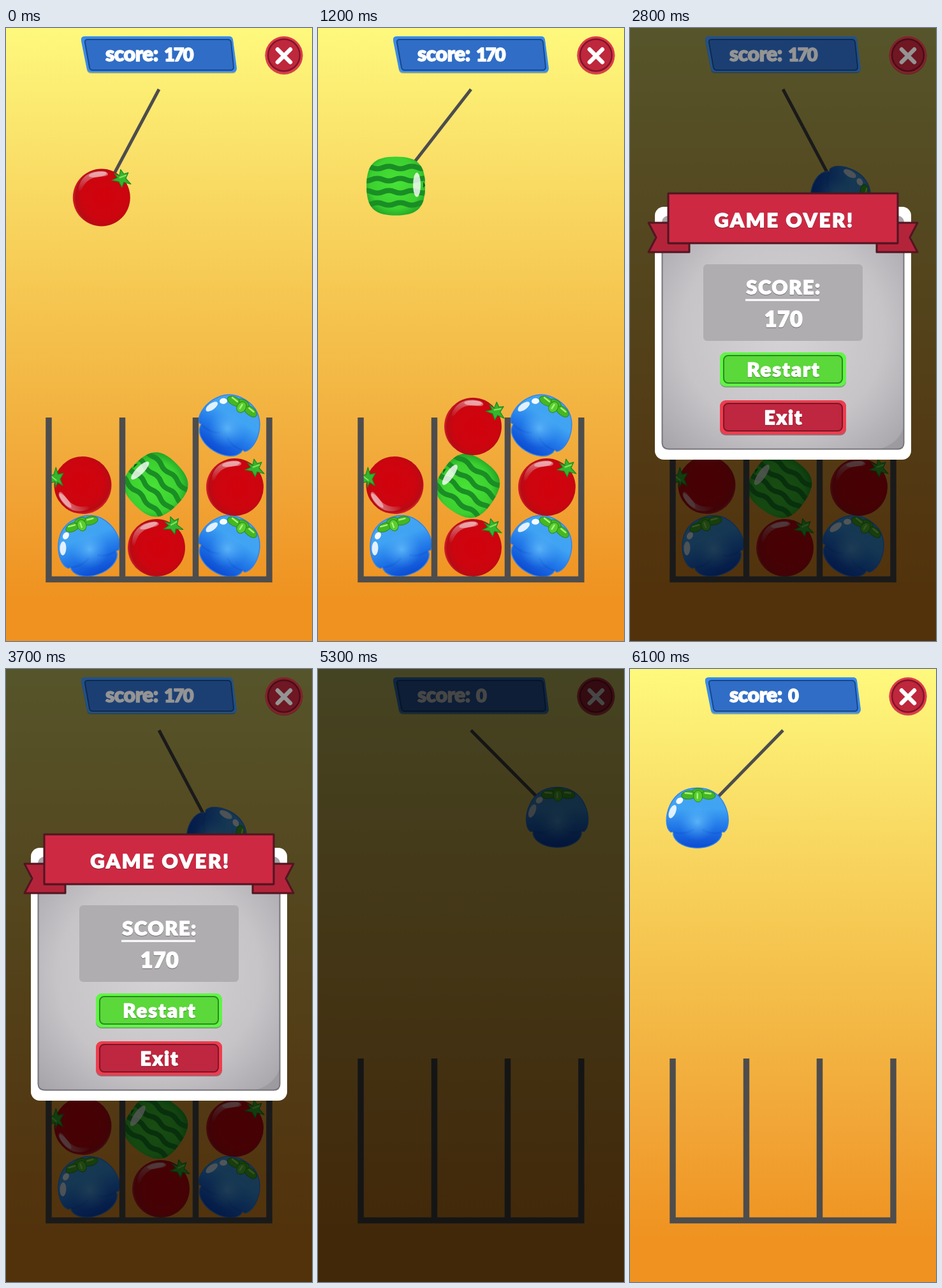
An HTML page that plays this animation: 480 px wide and 960 px high, repeating every 6.2 s.

```html
<!DOCTYPE html>
<html lang="en">
<head>
<meta charset="utf-8">
<title>Fruit drop</title>
<style>
  html, body { margin: 0; width: 100%; height: 100%; overflow: hidden; background: #000; }
  svg { display: block; width: 100vw; height: 100vh; }
  text { font-family: Lato, "Open Sans", sans-serif; font-weight: 900; fill: #fff;
         stroke: #fff; stroke-width: 1.4; stroke-linejoin: round; }
  #dialog text { text-anchor: middle; filter: drop-shadow(0 1.5px 0 #0006); }
</style>
</head>
<body>
<svg viewBox="0 0 480 960">
  <defs>
    <linearGradient id="sky" x2="0" y2="1">
      <stop offset="0" stop-color="#fef97d"/>
      <stop offset=".25" stop-color="#f9db64"/>
      <stop offset=".5" stop-color="#f4c04b"/>
      <stop offset=".75" stop-color="#f1a536"/>
      <stop offset=".93" stop-color="#ef9220"/>
    </linearGradient>
    <radialGradient id="red" cx=".55" cy=".5" r=".56">
      <stop offset="0" stop-color="#d2020c"/>
      <stop offset=".7" stop-color="#cc050f"/>
      <stop offset=".9" stop-color="#b80b15"/>
      <stop offset="1" stop-color="#dc2a30"/>
    </radialGradient>
    <radialGradient id="green" cx=".5" cy=".45" r=".62">
      <stop offset="0" stop-color="#48e236"/>
      <stop offset=".7" stop-color="#3cd030"/>
      <stop offset="1" stop-color="#1b9c25"/>
    </radialGradient>
    <linearGradient id="blue" x2="0" y2="1">
      <stop offset="0" stop-color="#46a5f0"/>
      <stop offset=".35" stop-color="#3fa3f3"/>
      <stop offset=".65" stop-color="#2177e8"/>
      <stop offset="1" stop-color="#0b4bd2"/>
    </linearGradient>
    <radialGradient id="glow">
      <stop offset="0" stop-color="#6cc4fb" stop-opacity=".9"/>
      <stop offset="1" stop-color="#4aa8f5" stop-opacity="0"/>
    </radialGradient>
    <linearGradient id="shine" x2="0" y2="1">
      <stop offset="0" stop-color="#fff" stop-opacity=".9"/>
      <stop offset="1" stop-color="#fff" stop-opacity=".05"/>
    </linearGradient>
    <radialGradient id="steel" r=".7">
      <stop offset="0" stop-color="#d6d3d7"/>
      <stop offset=".6" stop-color="#c7c4c8"/>
      <stop offset="1" stop-color="#a5a3a8"/>
    </radialGradient>
    <path id="rind" d="M-46 0C-46 -34 -34 -46 0 -46S46 -34 46 0S34 46 0 46S-46 34 -46 0Z"/>
    <clipPath id="rindClip"><use href="#rind"/></clipPath>

    <g id="tomato">
      <circle r="45" fill="url(#red)"/>
      <path d="M-36 -14C-33 -34 -16 -43 4 -41C13 -39 12 -33 2 -33C-14 -33 -25 -27 -31 -13C-34 -8 -37 -9 -36 -14Z" fill="url(#shine)" opacity=".5"/>
      <ellipse cx="-6" cy="-36" rx="14" ry="4" fill="#fff" opacity=".4" transform="rotate(-8 -6 -36)"/>
      <path d="M20 -38L28 -34L30 -44L35 -37L42 -39L38 -30L46 -21L35 -24L32 -16L27 -25L16 -27L25 -31Z" fill="#35b52d" stroke="#168a22" stroke-width="1.2" stroke-linejoin="round"/>
      <path d="M28 -31L39 -35" stroke="#8be45c" stroke-width="2"/>
    </g>

    <g id="melon">
      <use href="#rind" fill="url(#green)"/>
      <g id="stripes" clip-path="url(#rindClip)" fill="none" stroke="#1a8e25" stroke-width="8"/>
      <ellipse cx="33" cy="-2" rx="6" ry="19" fill="#fff" opacity=".8"/>
      <path d="M43 -7L46 -1L43 3Z" fill="#0c5a18"/>
    </g>

    <g id="berry">
      <path d="M-42 22C-51 15 -50 -5 -43 -20C-34 -39 -19 -47 0 -47S34 -39 43 -20C50 -5 51 15 42 22C38 20 37 22 38 26C35 39 18 47 0 47S-35 39 -38 26C-37 22 -38 20 -42 22Z" fill="url(#blue)" stroke="#3184ee" stroke-width="1.5"/>
      <path d="M-42 21Q-22 28 -6 18M42 21Q22 28 8 18" fill="none" stroke="#0b47c8" stroke-width="3" opacity=".25"/>
      <circle cy="6" r="30" fill="url(#glow)" opacity=".8"/>
      <ellipse cx="-39" cy="-10" rx="5" ry="11" fill="#fff" opacity=".85" transform="rotate(22 -39 -10)"/>
      <ellipse cx="-28" cy="-27" rx="6" ry="4.5" fill="#fff" opacity=".95" transform="rotate(-38 -28 -27)"/>
      <g fill="#45b722" stroke="#2a8c19">
        <ellipse cx="-13" cy="-36" rx="12" ry="6.5" transform="rotate(-6 -13 -36)"/>
        <ellipse cx="16" cy="-36" rx="12" ry="6.5" transform="rotate(8 16 -36)"/>
        <ellipse cx="1" cy="-42" rx="9" ry="4"/>
        <ellipse cx="1" cy="-34" rx="7" ry="9" fill="#58cd30"/>
      </g>
      <path d="M-19 -39L-9 -38M12 -39L21 -38M0 -38V-31" stroke="#a9f277" stroke-width="2.5" stroke-linecap="round"/>
    </g>
  </defs>

  <rect width="480" height="960" fill="url(#sky)"/>
  <path id="rope" stroke="#4d4d4d" stroke-width="5"/>
  <g id="pile"></g>
  <path d="M67 610V863.5H413V610M182.500 610V863M297.500 610V863" fill="none" stroke="#4d4d4d" stroke-width="9.500"/>
  <g id="moving"></g>
  <rect id="shade" width="480" height="960"/>

  <g id="hud">
    <path d="M124 15H350Q355 15 356 20L361 65Q361 71 355 71H134Q128 71 127 66L118 21Q117 15 124 15Z" fill="#1f5ca8" opacity=".5"/>
    <path d="M124 13H350Q355 13 356 18L362 63Q362 69 356 69H134Q128 69 127 64L118 19Q117 13 124 13Z" fill="#3a8bea"/>
    <path d="M128 18H348Q352 18 353 22L357 61Q357 66 352 66H136Q132 66 131 62L124 23Q123 18 128 18Z" fill="#306dc6" stroke="#17488b" stroke-width="2"/>
    <text x="156" y="52" font-size="32" letter-spacing="-.5">score:</text>
    <text id="score" x="248" y="52" font-size="29" letter-spacing="-2"></text>
    <circle cx="436" cy="43.500" r="29.500" fill="#8f1b2b" opacity=".6"/>
    <circle cx="436" cy="42.500" r="29.500" fill="#e03a49"/>
    <circle cx="436" cy="42.500" r="25" fill="#bf273c" stroke="#7f1529" stroke-width="2.500"/>
    <path d="M426 33.500L446 53.500M446 33.500L426 53.500" stroke="#fff" stroke-width="6.500" stroke-linecap="round"/>
  </g>

  <g id="dialog">
    <rect x="39" y="280" width="402" height="396" rx="14" fill="#fff"/>
    <rect x="50" y="294" width="380" height="366" rx="10" fill="url(#steel)"/>
    <path d="M430 622Q424 650 390 660H420Q430 660 430 650Z" fill="#98969b" opacity=".7"/>
    <path d="M50.500 310V650Q51 659.500 61 659.500H420Q429.500 659 429.500 650V310" fill="none" stroke="#77757b" stroke-width="2"/>
    <rect x="115" y="370" width="250" height="120" rx="6" fill="#b0adb1"/>
    <g fill="#b3243b" stroke="#511520" stroke-width="3" stroke-linejoin="round">
      <path d="M29 305H62V337H93V351H29L41 328Z"/>
      <path d="M451 305H418V337H387V351H451L439 328Z"/>
      <path d="M60 259H420V337H60Z" fill="#cd2943"/>
    </g>
    <text x="242" y="312" font-size="31" letter-spacing="2.700">GAME OVER!</text>
    <text x="241" y="417" font-size="31" letter-spacing="1.500">SCORE:</text>
    <path d="M181 426H297" stroke="#fff" stroke-width="3"/>
    <text x="241" y="468" font-size="34" letter-spacing="0.500">170</text>
    <g id="buttons"></g>
  </g>
  <rect id="fade" width="480" height="960"/>
</svg>
<script>
const LOOP = 6200, STEP = 100, PERIOD = 1566, SWING = Math.PI / 4;
const ROPE = 192, GRAVITY = 970, PIVOT = { x: 240, y: 96 };
const DROP_TOMATO = 180, LAND_TOMATO = 1010;
const DROP_MELON = 1342, LAND_MELON = 2240;
const FREEZE = 2349, RESTART = 4700, NEW_GAME = 5275;

const $ = id => document.getElementById(id);
const clamp = v => Math.max(0, Math.min(1, v));
const mix = (a, b, k) => a + (b - a) * k;
const ease = k => k * k * (3 - 2 * k);

function add(parent, tag, attrs, text = '') {
  const el = document.createElementNS('http://www.w3.org/2000/svg', tag);
  for (const name in attrs) el.setAttribute(name, attrs[name]);
  el.textContent = text;
  parent.append(el);
  return el;
}

const pose = (el, x, y, turn = 0) =>
  el.setAttribute('transform', `translate(${x} ${y}) rotate(${turn})`);

function fruit(kind, parent, x = 0, y = 0, turn = 0) {
  const el = add(parent, 'use', { href: '#' + kind });
  pose(el, x, y, turn);
  return el;
}

const show = (el, visible) => { el.style.display = visible ? '' : 'none'; };

for (let i = 0; i < 4; i++) {
  const bend = i % 2 ? 4 : -4;
  add($('stripes'), 'path', { d: `M-56 ${i * 19 - 29}q9 ${bend} 18 0t18 0t18 0t18 0t18 0t18 0t18 0` });
}

function button(y, label, size, rim, face, edge) {
  const box = $('buttons');
  add(box, 'rect', { x: 141, y: y + 2, width: 198, height: 53, rx: 9, fill: edge, opacity: .5 });
  add(box, 'rect', { x: 141, y, width: 198, height: 53, rx: 9, fill: rim });
  add(box, 'rect', { x: 147, y: y + 5, width: 186, height: 43, rx: 7, fill: face, stroke: edge, 'stroke-width': 2 });
  add(box, 'text', { x: 241, y: y + 38, 'font-size': size, 'letter-spacing': 2 }, label);
}
button(508, 'Restart', 31, '#60f545', '#5bd83a', '#2a8a22');
button(583, 'Exit', 30, '#ee3d4d', '#bf263f', '#7b1529');

const pile = $('pile');
fruit('berry', pile, 129.5, 811, -20);
fruit('tomato', pile, 120.5, 716, -122);
fruit('berry', pile, 350.5, 811, 32);
fruit('tomato', pile, 359, 719, 0);
fruit('berry', pile, 350.5, 622, 32);
const lowTomato = fruit('tomato', pile);
const midMelon = fruit('melon', pile);
const moving = $('moving');
const tomato = fruit('tomato', moving);
const melon = fruit('melon', moving);
const berry = fruit('berry', moving);

function ropeEnd(t) {
  const phase = t < RESTART ? Math.min(t, FREEZE) - DROP_MELON - PERIOD / 2 : Math.max(t, NEW_GAME) - NEW_GAME;
  const angle = SWING * Math.cos(2 * Math.PI * phase / PERIOD);
  return { x: PIVOT.x + ROPE * Math.sin(angle), y: PIVOT.y + ROPE * Math.cos(angle) };
}

// Position on the rope, then in free fall down to the resting place.
function dropped(t, release, rest) {
  const start = ropeEnd(Math.min(t, release));
  const s = Math.max(0, t - release) / 1000;
  const y = Math.min(rest.y, start.y + GRAVITY * s * s / 2);
  return { x: mix(start.x, rest.x, clamp((y - rest.y + 50) / 50)), y };
}

function blackness(t) {
  if (t < 4600) return 0;
  if (t < RESTART) return .55;
  return clamp(1 - (t - 5200) / 365);
}

function draw(t) {
  const first = t < RESTART, end = ropeEnd(t);
  $('rope').setAttribute('d', `M${PIVOT.x} ${PIVOT.y}L${end.x} ${end.y}`);

  const settle = ease(clamp((t - LAND_TOMATO) / 180));
  pose(lowTomato, mix(236, 243, settle), 814, mix(-10, -3, settle));
  pose(midMelon, 235, mix(715, 717, settle), mix(225, 215, settle));

  const a = dropped(t, DROP_TOMATO, { x: 243, y: 624 });
  pose(tomato, a.x, a.y, 10 * settle);
  const b = dropped(t, DROP_MELON, { x: 118, y: 624 });
  pose(melon, b.x, b.y);
  pose(berry, end.x, end.y, first ? 97 : 0);

  show(pile, first);
  show(tomato, first);
  show(melon, first && t >= LAND_TOMATO);
  show(berry, t >= LAND_MELON);
  $('score').textContent = first ? '170' : '0';

  const over = first ? ease(clamp((t - 2200) / 500)) : 0;
  $('shade').setAttribute('opacity', .66 * over);
  $('hud').style.filter = over ? `brightness(${1 - .42 * over})` : 'none';
  $('dialog').setAttribute('opacity', over);
  $('fade').setAttribute('opacity', blackness(t));
}

const began = performance.now();
function tick() {
  const t = (performance.now() - began) % LOOP;
  draw(Math.floor(t / STEP) * STEP);
  requestAnimationFrame(tick);
}
tick();
</script>
</body>
</html>
```
